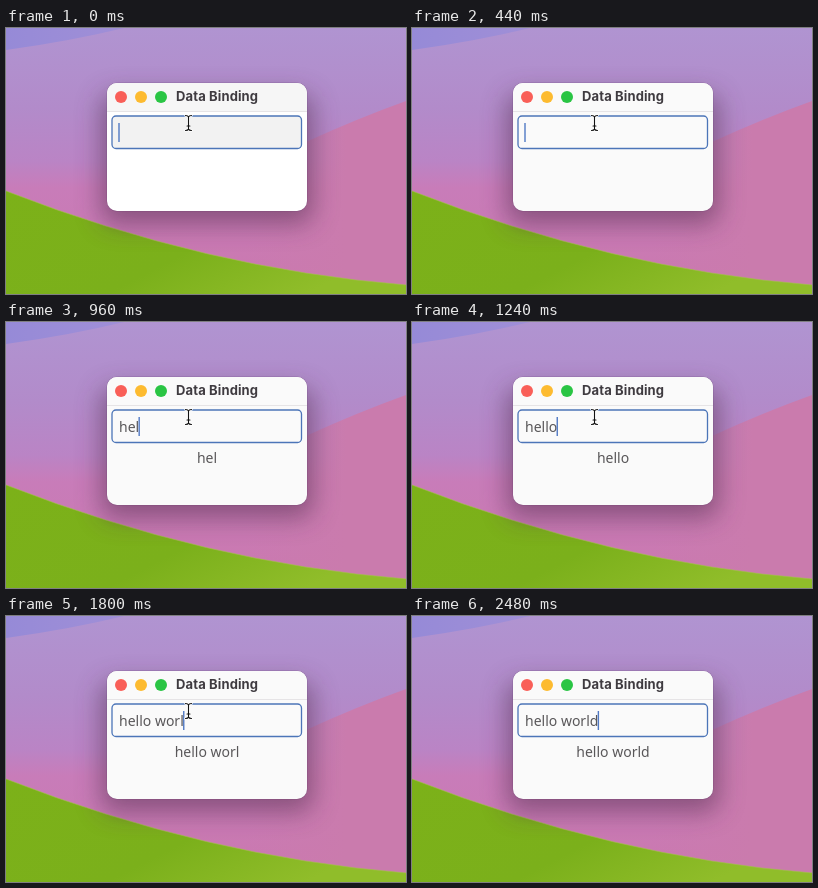
An HTML page for the animation above (2.6 s loop, 400 px wide and 266 px high).

```html
<!DOCTYPE html>
<html lang="en">
<head>
<meta charset="utf-8">
<title>Data Binding</title>
<style>
  html, body { margin: 0; width: 100%; height: 100%; overflow: hidden; }
  svg { display: block; width: 100vw; height: 100vh; }
  .body-text { font: 14px "Noto Sans", "Open Sans", sans-serif; fill: #595759; white-space: pre; }
  .title { font: 700 13px Inter, "Liberation Sans", sans-serif; letter-spacing: .13px; fill: #3f3b40; }
</style>
</head>
<body>
<svg viewBox="0 0 400 266" preserveAspectRatio="none">
  <defs>
    <linearGradient id="sky" x1="0" y1="0" x2="0" y2="1">
      <stop offset="0" stop-color="#b094d1"/>
      <stop offset=".3" stop-color="#b28bca"/>
      <stop offset=".5" stop-color="#ba84c5"/>
      <stop offset=".6" stop-color="#c87cb9"/>
      <stop offset="1" stop-color="#cb78ae"/>
    </linearGradient>
    <linearGradient id="pink" gradientUnits="userSpaceOnUse" x1="240" y1="0" x2="340" y2="0">
      <stop offset="0" stop-color="#ca7bad" stop-opacity="0"/>
      <stop offset="1" stop-color="#ca7bad"/>
    </linearGradient>
    <linearGradient id="blue" x1="0" y1="0" x2="1" y2="0">
      <stop offset="0" stop-color="#968ad7"/>
      <stop offset="1" stop-color="#a08fd7"/>
    </linearGradient>
    <linearGradient id="hill" x1="0" y1="0" x2="1" y2=".5">
      <stop offset="0" stop-color="#7cb119"/>
      <stop offset=".6" stop-color="#7bb01b"/>
      <stop offset="1" stop-color="#90bd2a"/>
    </linearGradient>
    <filter id="soft" x="-40%" y="-40%" width="180%" height="190%">
      <feGaussianBlur stdDeviation="13"/>
    </filter>
    <path id="ridge" d="M0 163Q200 241 400 257"/>
    <path id="beamShape" d="M-3 -7.5Q-.5 -7.5 0 -6Q.5 -7.5 3 -7.5M0 -6V6M-3 7.5Q-.5 7.5 0 6Q.5 7.5 3 7.5M-1.5 3H1.5"/>
  </defs>

  <rect width="400" height="266" fill="url(#sky)"/>
  <path d="M0 0H118Q65 13 0 22Z" fill="url(#blue)"/>
  <path d="M400 73Q350 91 300 114L240 144V266H400Z" fill="url(#pink)"/>
  <path d="M0 163Q200 241 400 257V266H0Z" fill="url(#hill)"/>
  <use href="#ridge" fill="none" stroke="#a3c24a" stroke-opacity=".6"/>

  <rect x="95" y="66" width="212" height="130" rx="14" fill="#4d2b4a" opacity=".52" filter="url(#soft)"/>
  <rect x="100.5" y="54.5" width="201" height="129" rx="10.5" fill="#5b3763" opacity=".3"/>
  <rect id="pane" x="101" y="55" width="200" height="128" rx="10"/>
  <path id="bar" d="M101 83V65a10 10 0 0 1 10-10H291a10 10 0 0 1 10 10V83Z"/>
  <path d="M101 83.5H301" stroke="#e6e4e6"/>
  <circle cx="115" cy="69" r="6" fill="#f95f58"/>
  <circle cx="135" cy="69" r="6" fill="#fdbb30"/>
  <circle cx="155" cy="69" r="6" fill="#2ac544"/>
  <text class="title" x="170" y="73.4">Data Binding</text>

  <rect id="field" x="106" y="88" width="189.5" height="32.5" rx="4" stroke="#4c75b8" stroke-width="1.3"/>
  <text id="typed" class="body-text" x="113" y="110" xml:space="preserve"></text>
  <rect id="caret" y="95" width="1.4" height="19" fill="#5079c4"/>
  <text id="echo" class="body-text" x="201" y="141" text-anchor="middle" xml:space="preserve"></text>

  <g id="pointer">
    <g id="beam" fill="none" stroke-linecap="round">
      <use href="#beamShape" stroke="#fff" stroke-width="2.4"/>
      <use href="#beamShape" stroke="#111" stroke-width="1.1"/>
    </g>
    <path id="arrow" d="M0 0V14L3.3 11L5.5 16L8 15L5.8 10H10.2Z" fill="#111" stroke="#fff"/>
  </g>
</svg>
<script>
  const LOOP = 2600, STEP = 40;
  const PHRASE = "hello world";
  const KEY_TIMES = [760, 860, 960, 1080, 1240, 1400, 1520, 1600, 1700, 1800, 1960];
  const $ = id => document.getElementById(id);
  const clamp = v => Math.max(0, Math.min(1, v));
  const gray = v => `rgb(${v},${v},${v})`;
  const mix = (a, b, p) => Math.round(a + (b - a) * p);

  function drawWindow(t) {
    const p = clamp((t - 40) / 200);
    $("pane").setAttribute("fill", gray(mix(255, 250, p)));
    $("bar").setAttribute("fill", gray(mix(246, 250, p)));
    $("field").setAttribute("fill", gray(mix(242, 250, p)));
  }

  function drawText(t) {
    const text = PHRASE.slice(0, KEY_TIMES.filter(k => k <= t).length);
    const typed = $("typed");
    typed.textContent = $("echo").textContent = text;
    const width = text ? typed.getComputedTextLength() : 0;
    $("caret").setAttribute("x", 112.3 + width);
  }

  function drawPointer(t) {
    const p = clamp((t - 2240) / 240);
    const y = t < 2240 ? 95 : 106 + 175 * p ** 1.4;
    const inField = y < 121;
    $("pointer").setAttribute("transform", `translate(${182.5 + 10 * p} ${y})`);
    $("beam").setAttribute("visibility", inField ? "visible" : "hidden");
    $("arrow").setAttribute("visibility", inField ? "hidden" : "visible");
  }

  function frame(now) {
    const t = Math.floor((now % LOOP) / STEP) * STEP;
    drawWindow(t);
    drawText(t);
    drawPointer(t);
    requestAnimationFrame(frame);
  }
  frame(performance.now());
</script>
</body>
</html>
```
